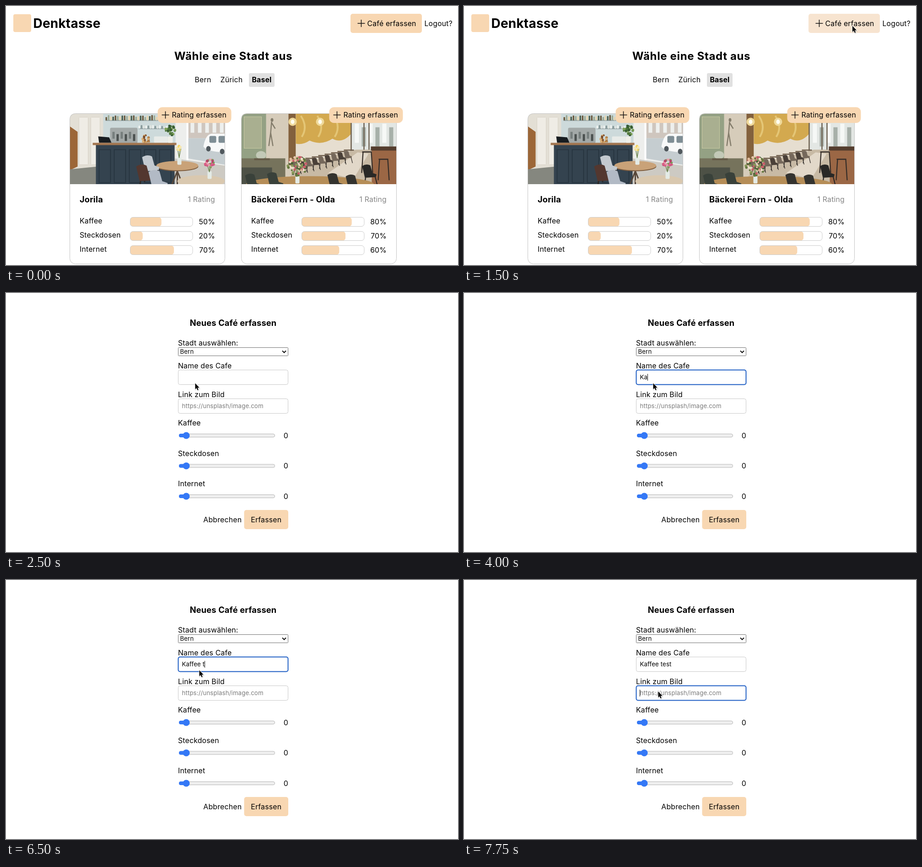
Recreate the animation shown at these times as an HTML page. Size 988 by 567 pixels, loop 8 s.

```html
<!DOCTYPE html>
<html lang="de">
<head>
<meta charset="utf-8">
<title>Café-Verzeichnis</title>
<style>
  html, body { margin: 0; width: 100%; height: 100%; overflow: hidden; background: #fff; }
  svg { display: block; width: 988px; height: 567px; }
  text { font: 15.8px Inter, sans-serif; letter-spacing: .2px; white-space: pre; }
  .b { font-weight: 700; }
  .brand { font-size: 28px; }
  .h1 { font-size: 24px; letter-spacing: .65px; }
  .h2 { font-size: 18.2px; }
  .in { font-size: 13.2px; letter-spacing: .15px; }
  .mute { fill: #858585; }
  .hint { fill: #7a7a7a; }
  .end { text-anchor: end; }
  .mid { text-anchor: middle; }
</style>
</head>
<body>
<svg id="stage" viewBox="0 0 988 567" xmlns="http://www.w3.org/2000/svg"></svg>
<script>
const PEACH = '#f8d7b2', HOVER = '#f7e4d0', BLUE = '#1f5ec4';
const LOOP = 8000, STEP = 250;

const rect = (x, y, w, h, fill, r = 0, more = '') =>
  `<rect x="${x}" y="${y}" width="${w}" height="${h}" rx="${r}" fill="${fill}" ${more}/>`;
const oval = (x, y, rx, ry, fill) =>
  `<ellipse cx="${x}" cy="${y}" rx="${rx}" ry="${ry}" fill="${fill}"/>`;
const shape = (d, fill) => `<path d="${d}" fill="${fill}"/>`;
const line = (d, color, w) => `<path d="${d}" fill="none" stroke="${color}" stroke-width="${w}"/>`;
const text = (x, y, s, cls = '', more = '') => `<text x="${x}" y="${y}" class="${cls}" ${more}>${s}</text>`;
const plus = (x, y) => line(`M${x - 8} ${y}h16M${x} ${y - 8}v16`, '#111', 1.5);
const repeat = (n, f) => Array.from({ length: n }, (_, i) => f(i)).join('');

let seed = 7;
const rnd = () => (seed = seed * 16807 % 2147483647) / 2147483647;

// round cloud of small leaves or petals
const cluster = (x, y, r, n, colors) => repeat(n, i => {
  const a = rnd() * 6.283, d = r * Math.sqrt(rnd()), size = 2 + rnd();
  return oval(x + Math.cos(a) * d, y + Math.sin(a) * d, size, size, colors[i % colors.length]);
});

const shelf = (x, y, n, h, colors) => line(`M${x} ${y}h${n * 5}`, '#8f9d9f', 2)
  + repeat(n, i => {
    const tall = h * (.6 + .4 * rnd());
    return rect(x + i * 5, y - tall, 3.5, tall, colors[i % colors.length], 1);
  });

const table = (x, y, r, top) => line(`M${x} ${y}v50M${x} ${y + 12}l-14 35M${x} ${y + 12}l14 35`, '#574739', 3)
  + oval(x, y + 2, r, r / 4.5, '#7e5d3f') + oval(x, y, r, r / 4.5, top);

const chair = (x, y, s, color) => `<g transform="translate(${x} ${y}) scale(${s})">`
  + shape('M0 4Q12-4 24 2L30 24 42 28 40 36 8 38z', color) + line('M10 38l-4 26M38 35l7 28', '#2c2724', 3) + '</g>';

const vase = (x, y, h) => rect(x - 4, y - 16, 9, 17, '#e4ebe6', 2)
  + repeat(3, i => line(`M${x} ${y - 14}l${i * 4 - 4} ${-h}`, '#6c8550', 1.2));

// both rooms are 339 x 155
function barRoom() {
  return rect(0, 0, 339, 155, '#e3dfd5')
    + repeat(2, i => rect(20 + i * 26, 8, 20, 104, '#efece5', 1, 'stroke="#d8d2c6"'))
    + shape('M0 28l17 12v76L0 124z', '#9c6637')
    + shape('M0 122l60-6v39H0z', '#85877f')
    + rect(73, 0, 160, 68, '#cddadb')
    + shelf(78, 15, 23, 12, ['#6c5b40', '#9caa95', '#e6d4ad', '#4e6253'])
    + shelf(150, 33, 14, 8, ['#eef2f0', '#87999a', '#dfe3df'])
    + rect(88, 31, 60, 34, '#a3a9a8', 3)
    + repeat(6, i => rect(93 + i * 9, 40 + i % 2 * 5, 5, 15, i % 2 ? '#4a504f' : '#767e7d'))
    + cluster(167, 56, 9, 18, ['#b58147', '#7c4c29', '#d9ad73'])
    + rect(184, 50, 30, 14, '#e8ebe8', 2)
    + shape('M62 50l24 2 5 12H64z', '#171c20')
    + rect(231, 0, 108, 155, '#edeeec')
    + rect(259, 0, 80, 54, '#cfc6be')
    + repeat(5, i => rect(264 + i * 16, 8, 8, 34, '#eef0ee'))
    + shape('M257 54h82v58l-82-14z', '#c5cdd0')
    + shape('M292 72q5-27 18-28h29v41q-42-2-47-13z', '#f8f9f9')
    + repeat(2, i => rect(305 + i * 20, 49, 15, 15, '#7f8e95', 3) + oval(303 + i * 30, 77 + i * 6, 5, 6, '#50585d'))
    + line('M257 0v112', '#fff', 4)
    + shape('M228 98l111 16v41H220z', '#cdcac3')
    + rect(57, 68, 172, 87, '#34434f')
    + repeat(5, i => rect(64 + i * 33, 79, 25, 72, 'none', 0, 'stroke="#25323d" stroke-width="1.6"'))
    + rect(50, 64, 183, 5, '#a37650')
    + rect(214, 50, 11, 14, '#efefe8', 2) + cluster(219, 37, 11, 30, ['#50773c', '#7c9f56', '#355a31'])
    + table(235, 114, 46, '#c9a278')
    + chair(158, 92, .9, '#c3c9cf') + chair(145, 112, .95, '#53372f') + chair(172, 124, 1, '#b2bac5')
    + vase(239, 111, 20) + cluster(238, 76, 5, 8, ['#f3d45d', '#f6e7b0'])
    + oval(287, 148, 52, 13, '#d9c8af')
    + vase(305, 142, 14) + cluster(306, 110, 10, 28, ['#d85d86', '#ed9cad', '#b64369', '#7a9b59']);
}

function muralRoom() {
  return rect(0, 0, 339, 155, '#d6ccba')
    + rect(0, 0, 54, 100, '#94a184')
    + rect(6, 7, 38, 69, '#a9af90', 0, 'stroke="#c9caa2"')
    + oval(67, 14, 3, 4, '#847d6c') + line('M66 18l-2 24-4 29M64 42l5 29M66 20l8 13', '#847d6c', 2.5)
    + rect(103, 0, 16, 113, '#83613d')
    + rect(119, 0, 122, 105, '#e6ded0')
    + shape('M119 0h122v43q-20 24-42 12-24 16-50 4-14 10-30 7z', '#d3a94f')
    + repeat(3, i => line(`M${130 + i * 36} 5q16 24 2 46`, '#e4c676', 4))
    + rect(241, 0, 98, 90, '#e3e7e4')
    + repeat(6, i => rect(248 + i * 15, 22 + i % 2 * 8, 9, 42, i % 2 ? '#a7b0a9' : '#f6f8f6'))
    + line('M240 17h99M240 0v86M268 0v92M279 0v92', '#6d6051', 2.5)
    + shape('M118 112L250 79h50l39 76H100z', '#c8baa5')
    + shape('M190 130l64-45 24 3-33 55z', '#e2d8c9')
    + repeat(9, i => {
      const x = 112 + i * 14, y = 104 - i * 3;
      return line(`M${x} ${y}h22`, '#6b5a48', 2.5) + chair(x, y + 2, .42, i % 2 ? '#4a4038' : '#75685b');
    })
    + repeat(2, i => oval(112 + i * 60, 18, 9, 9, '#efd99a') + oval(112 + i * 60, 18, 4, 5, '#fffdf0'))
    + rect(0, 98, 96, 57, '#76735c') + rect(0, 118, 67, 37, '#4d5146')
    + oval(43, 91, 11, 9, '#c3c9b7') + rect(28, 98, 34, 4, '#655b48')
    + rect(285, 74, 54, 81, '#9b6745') + rect(283, 72, 56, 9, '#543d2e')
    + repeat(2, i => line(`M${264 + i * 36} ${84 + i * 16}h20l3 46M${266 + i * 36} ${84 + i * 16}l-3 46`, '#352d28', 2.3))
    + chair(264, 112, .75, '#292826')
    + oval(150, 155, 140, 18, '#b58d57')
    + repeat(2, i => chair(188 + i * 40, 131 + i * 3, .85, '#34332f') + chair(8 + i * 48, 132 - i * 3, .85, '#39413a'))
    + vase(122, 152, 24) + cluster(122, 114, 22, 75, ['#65783f', '#879858', '#c85e69', '#e2bd9d', '#49613a', '#efddc7']);
}

function card(x, name, room, values) {
  const rows = ['Kaffee', 'Steckdosen', 'Internet'].map((label, i) => {
    const y = 462 + i * 31;
    return text(21.5, y + 14, label)
      + rect(132, y + .5, 136.5 * values[i] / 100, 20, PEACH, 6)
      + rect(132, y + .5, 136.5, 20, 'none', 6, 'stroke="#ccc"')
      + text(317.5, y + 16, values[i] + '%', 'end');
  }).join('');
  return `<g transform="translate(${x} 0)">`
    + `<g clip-path="url(#photo)"><g transform="translate(0 235.5)">${room}</g></g>`
    + rect(0, 235.5, 339, 329, 'none', 12, 'stroke="#c4c4c4"')
    + rect(192, 221.5, 161, 34.5, PEACH, 10) + plus(209, 238.5) + text(223, 244, 'Rating erfassen')
    + text(21.5, 430, name, 'b h2') + text(317.5, 429, '1 Rating', 'mute end')
    + rows + '</g>';
}

function listPage() {
  return rect(16, 18, 39, 39, PEACH, 4)
    + text(59.5, 48, 'Denktasse', 'b brand')
    + rect(753, 17, 156, 42, PEACH, 5, 'id="add"') + plus(776.5, 38)
    + text(789.5, 43.5, 'Café erfassen') + text(976, 43.5, 'Logout?', 'end')
    + text(497, 118, 'Wähle eine Stadt aus', 'b h1 mid')
    + rect(531, 147, 56, 30, '#e0e0e0', 3)
    + text(430.5, 167, 'Bern', 'mid') + text(493, 167, 'Zürich', 'mid') + text(559, 167, 'Basel', 'b mid')
    + card(139.5, 'Jorila', barRoom(), [50, 20, 70])
    + card(514.5, 'Bäckerei Fern - Olda', muralRoom(), [80, 70, 60]);
}

const field = (label, i) => text(376, 164.5 + i * 63, label)
  + rect(376.5, 168.5 + i * 63, 240, 32, '#fff', 4, `id="box${i}"`);

function slider(label, i) {
  const y = 312 + i * 66.5;
  return text(376, y - 22, label)
    + rect(378.5, y - 3.5, 209, 7, '#efefef', 3.5, 'stroke="#b5b5b5"')
    + rect(378, y - 4, 18, 8, '#3478f6', 4) + oval(394, y, 7.6, 7.6, '#3478f6')
    + text(617, y + 5.5, '0', 'end');
}

function formPage() {
  return text(496.5, 71.5, 'Neues Café erfassen', 'b h2 mid')
    + text(376, 115, 'Stadt auswählen:')
    + rect(376.5, 119.5, 240, 18, '#fff', 1, 'stroke="#707070"')
    + text(380.5, 132.5, 'Bern', 'in') + line('M604 126.5l4 4 4-4', '#111', 2)
    + ['Name des Cafe', 'Link zum Bild'].map(field).join('')
    + text(384.5, 189.3, '', 'in', 'id="typed"')
    + text(384.5, 252.3, 'https://unsplash/image.com', 'in hint')
    + ['Kaffee', 'Steckdosen', 'Internet'].map(slider).join('')
    + text(473.3, 501.5, 'Abbrechen', 'mid')
    + rect(520.5, 475, 96.5, 42, PEACH, 5) + text(568.7, 501.5, 'Erfassen', 'mid')
    + rect(0, 0, 1, 15, '#111', 0, 'id="caret"');
}

const ARROW = 'M0 0V13.2L3 10.5 5 15.2 7.2 14.2 5.2 9.7H9.2Z';
document.getElementById('stage').innerHTML =
  '<defs><clipPath id="photo"><path d="M0 390V247.5q0-12 12-12H327q12 0 12 12V390z"/></clipPath></defs>'
  + `<g id="list">${listPage()}</g><g id="form">${formPage()}</g>`
  + `<g id="mouse"><path d="${ARROW}" transform="translate(.6 1.6)" opacity=".15" stroke="#000" stroke-width="1.4"/>`
  + `<path d="${ARROW}" stroke="#fff" stroke-width="1.6" paint-order="stroke"/></g>`;

const [list, form, add, typed, caret, mouse, ...boxes] =
  ['list', 'form', 'add', 'typed', 'caret', 'mouse', 'box0', 'box1'].map(id => document.getElementById(id));

const HOVER_AT = 1500, OPEN_AT = 1750, NAME_AT = 2750, TYPE_AT = 3750, LINK_AT = 7750;

// what is typed in each step
const KEYS = 'K,a,f,f,,ee,, ,,,,t,e,s,t'.split(',');

// where the pointer rests: time, x, y
const STOPS = [
  [500, 857, 63], [750, 850, 45], [1000, 849, 43.5], [2000, 803, 51], [2250, 411, 202.5],
  [2500, 413.5, 197.5], [5500, 422.5, 197.5], [7250, 422, 230.5], [7500, 424.5, 244]
];

const show = (el, on) => el.setAttribute('display', on ? 'inline' : 'none');

function draw(t) {
  show(list, t < OPEN_AT);
  show(form, t >= OPEN_AT);
  add.setAttribute('fill', t >= HOVER_AT ? HOVER : PEACH);

  const stop = STOPS.filter(s => s[0] <= t).pop();
  show(mouse, stop);
  if (stop) mouse.setAttribute('transform', `translate(${stop[1]} ${stop[2]})`);

  const active = t < NAME_AT ? -1 : t < LINK_AT ? 0 : 1;
  boxes.forEach((box, i) => {
    box.setAttribute('stroke', i === active ? BLUE : '#c8c8c8');
    box.setAttribute('stroke-width', i === active ? 2 : 1);
  });

  const done = KEYS.slice(0, Math.max(0, Math.floor((t - TYPE_AT) / STEP) + 1));
  typed.textContent = done.join('');

  // the caret starts a new blink with every key and every change of field
  const key = done.findLastIndex(s => s);
  const since = active === 1 ? LINK_AT : key < 0 ? NAME_AT : TYPE_AT + key * STEP;
  show(caret, active >= 0 && (t - since) % 1000 < 500);
  const width = active === 0 && key >= 0 ? typed.getComputedTextLength() : 0;
  caret.setAttribute('x', Math.round(384.4 + width));
  caret.setAttribute('y', 177 + 63 * Math.max(0, active));
}

function tick() {
  draw(performance.now() % LOOP);
  requestAnimationFrame(tick);
}
tick();
</script>
</body>
</html>
```
